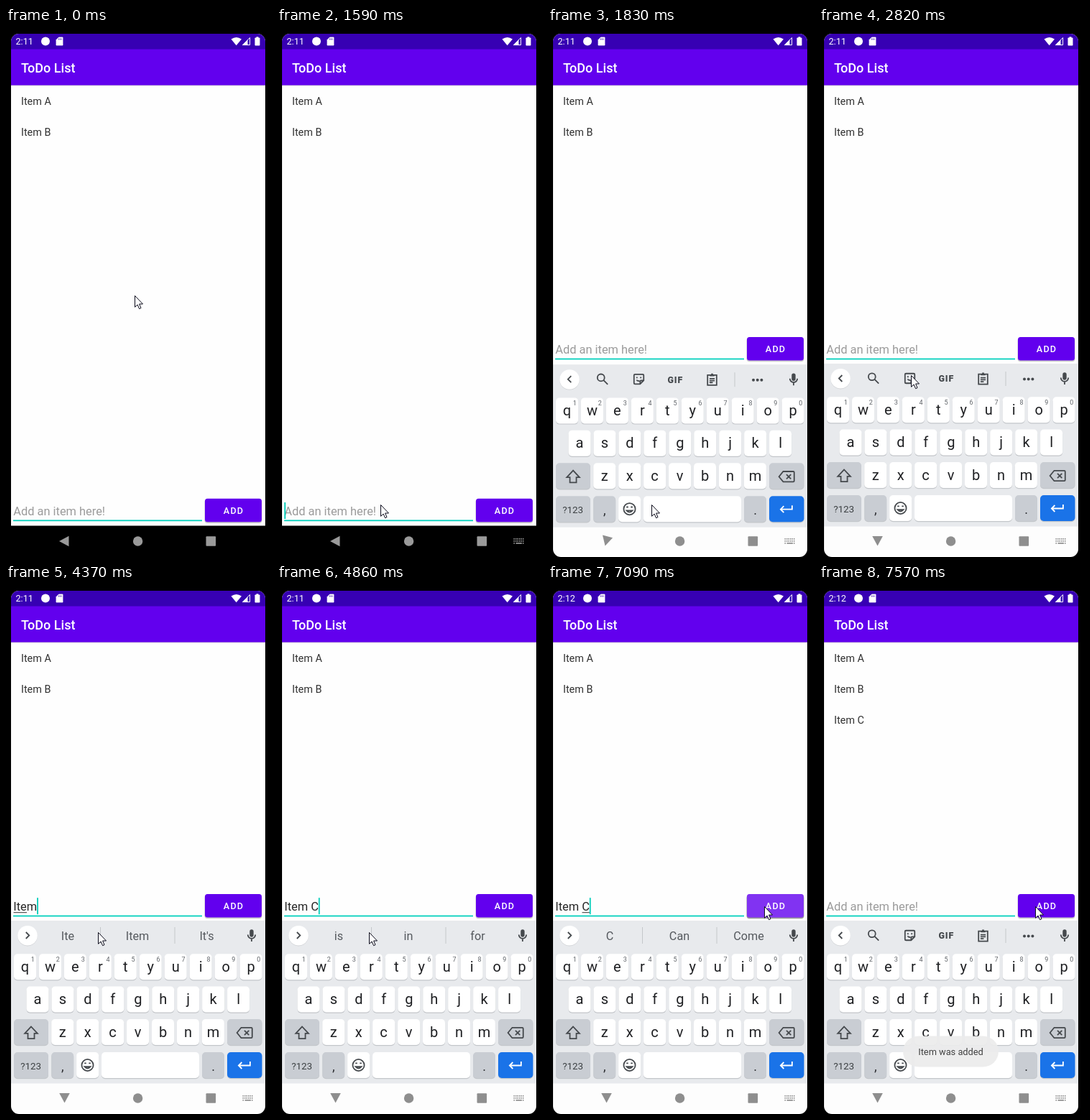
Animation of 369 by 736 pixels, one loop 8000 ms. Source, as an HTML page:

```html
<!DOCTYPE html>
<html lang="en">
<head>
<meta charset="utf-8">
<title>ToDo List</title>
<style>
html, body { margin: 0; width: 100%; height: 100%; overflow: hidden; background: #000; }
svg { display: block; width: 100vw; height: 100vh; }
text { font-family: Roboto, "Noto Sans", sans-serif; white-space: pre; }
.mid { text-anchor: middle; }
.icon { fill: none; stroke: #45494d; stroke-width: 2; }
</style>
</head>
<body>
<svg id="stage" viewBox="0 0 369 736"></svg>
<script>
const NS = 'http://www.w3.org/2000/svg';
const LOOP = 8000;
const stage = document.getElementById('stage');

function add(parent, tag, attrs = {}, text) {
  const el = document.createElementNS(NS, tag);
  for (const k in attrs) el.setAttribute(k, attrs[k]);
  if (text !== undefined) el.textContent = text;
  parent.appendChild(el);
  return el;
}
const group = (p, attrs) => add(p, 'g', attrs);
const rect = (p, x, y, width, height, fill, rx = 0) => add(p, 'rect', { x, y, width, height, fill, rx });
const dot = (p, cx, cy, r, fill) => add(p, 'circle', { cx, cy, r, fill });
const label = (p, x, y, size, fill, str, more) =>
  add(p, 'text', { x, y, 'font-size': size, fill, ...more }, str);
const icon = (p, x, y, d, more) =>
  add(p, 'path', { class: 'icon', d, transform: `translate(${x} ${y}) scale(.9)`, ...more });
const show = (el, on) => el.setAttribute('visibility', on ? 'inherit' : 'hidden');
const MID = { class: 'mid' };

// Screen
const clip = add(add(stage, 'defs'), 'clipPath', { id: 'screen' });
rect(clip, 7, 8, 354, 728, '#fff', 11);
rect(stage, 0, 0, 369, 736, '#000');
const screen = group(stage, { 'clip-path': 'url(#screen)' });
rect(screen, 7, 8, 354, 684.5, '#fefefe');
rect(screen, 7, 79, 354, 1, '#b9a3d8');
rect(screen, 7, 80, 354, 1, '#ececec');
rect(screen, 7, 29, 354, 50.5, '#6200ee');
rect(screen, 7, 8, 354, 21.5, '#3700b3');
label(screen, 21, 62, 18, '#fff', 'ToDo List', { 'font-weight': 500 });

// Status bar
const clock = label(screen, 13.5, 23.3, 12.6, '#fff', '2:11');
dot(screen, 55, 18.5, 6, '#fff');
add(screen, 'path', { d: 'M73.5 13H79V24H70V16.5Z', fill: '#fff', stroke: '#fff', 'stroke-linejoin': 'round', 'stroke-width': .8 });
add(screen, 'path', { d: 'M73.5 14.5v2M75.3 14.5v2M77.1 14.5v2', stroke: '#3700b3', 'stroke-width': .8 });
add(screen, 'path', { d: 'M313.5 15.5Q320.7 10.5 328 15.5L320.7 24.2Z', fill: '#fff' });
add(screen, 'path', { d: 'M329.5 23.6L339.6 13.5V23.6Z', fill: 'none', stroke: '#fff' });
add(screen, 'path', { d: 'M329 24L336.5 16.5V24Z', fill: '#fff' });
rect(screen, 346.5, 13.5, 7, 11, '#fff', .8);
rect(screen, 348.5, 12.3, 3, 2, '#fff');

// List
const items = ['A', 'B', 'C'].map((c, i) =>
  label(screen, 21, 107 + 43.2 * i, 14.4, '#303030', 'Item ' + c));

// Entry row
const row = group(screen);
const hint = label(row, 10.3, 678, 16.4, '#9b9b9b', 'Add an item here!');
const typed = label(row, 10.3, 678, 16.4, '#262626', '');
const mark = rect(row, 10, 680, 0, 1, '#333');
rect(row, 10, 684.4, 263, 1.8, '#03d0bd');
const caret = rect(row, 10, 660, 1.8, 23, '#03cdb9');
const shade = rect(row, 276.5, 656, 80, 33, '#000', 4);
rect(row, 277, 654.8, 79, 32.4, '#6200ee', 3.5);
const ripple = rect(row, 277, 654.8, 79, 32.4, '#fff', 3.5);
label(row, 317, 675.6, 12.6, '#fff', 'ADD', { class: 'mid', 'font-weight': 500, 'letter-spacing': 1.15 });

// Keyboard
const board = group(screen);
rect(board, 7, 467, 354, 227, '#e8eaed');
rect(board, 7, 693.5, 354, 70, '#fdfdfd');
dot(board, 30, 488.6, 13.8, '#cfd1d4');
dot(board, 30, 487.8, 13.8, '#fff');
const chevron = icon(board, 30, 487.5, 'M2.5 -5L-2.5 0L2.5 5');
icon(board, 342, 487.5, 'M-5.8 -1a5.8 5.8 0 0 0 11.6 0M0 5V9.5');
rect(board, 339.3, 479.2, 5.4, 10.5, '#45494d', 2.7);

const tools = group(board);
icon(tools, 76, 487.5, 'M-8 -2.5a5.5 5.5 0 1 0 11 0a5.5 5.5 0 1 0 -11 0M1.6 1.6L8 8');
icon(tools, 126.5, 487.5, 'M-6 -7.5H6Q7.5 -7.5 7.5 -6V2L2 7.5H-6Q-7.5 7.5 -7.5 6V-6Q-7.5 -7.5 -6 -7.5ZM7.5 2H3.5Q2 2 2 3.5V7.5M-4 -2.5h2M2 -2.5h2M-3.5 1Q-2 3.5 1 2.5');
label(tools, 177.4, 492.4, 12.4, '#45494d', 'GIF', { class: 'mid', 'font-weight': 900, 'letter-spacing': 1 });
icon(tools, 228.5, 488, 'M-7 -7H7V8.5H-7ZM-4 -1.5H4M-4 1.5H4M-4 4.5H1');
icon(tools, 228.5, 488, 'M-3.5 -6.2H3.5M-1.5 -8.4H1.5', { 'stroke-width': 2.6 });
rect(tools, 259.5, 478, 1, 20, '#c4c7ca');
for (const x of [286, 291.7, 297.4]) dot(tools, x, 488.5, 2, '#45494d');

const hints = group(board);
const words = [86, 183, 279.5].map(x => label(hints, x, 493.8, 16.2, '#55595e', '', MID));
for (const x of [131, 234.5]) rect(hints, x, 476, 1, 23, '#c4c7ca');

const PITCH = 34.95;
function key(x, y, w, fill) {
  rect(board, x, y + 1.2, w, 36, '#c3c6ca', 5);
  rect(board, x, y, w, 36, fill, 5);
}
function letters(str, x0, y, digits) {
  [...str].forEach((c, i) => {
    const x = x0 + PITCH * i;
    key(x, y, 31, '#fff');
    label(board, x + 15.5, y + 24.6, 20, '#1f2023', c, MID);
    if (digits) label(board, x + 26.3, y + 10.8, 9, '#5f6368', (i + 1) % 10, MID);
  });
}
letters('qwertyuiop', 11, 513.2, true);
letters('asdfghjkl', 28.5, 558.5);
letters('zxcvbnm', 63.2, 604);
const GREY = '#c9cdd3';
key(11, 604, 48, GREY);
key(308, 604, 48.5, GREY);
key(11, 650, 48, GREY);
key(63.2, 650, 31, GREY);
key(98.1, 650, 31, '#fff');
key(133, 650, 136, '#fff');
key(273, 650, 31, GREY);
key(308, 650, 48.5, '#1a73e8');
icon(board, 35, 623, 'M0 -9.5L-9.8 1H-5V9H5V1H9.8Z');
icon(board, 332, 623, 'M-5 -8H10.5Q12 -8 12 -6.5V6.5Q12 8 10.5 8H-5L-11.5 0ZM0 -3.5L7 3.5M7 -3.5L0 3.5');
icon(board, 113.5, 668, 'M-9 0a9 9 0 1 0 18 0a9 9 0 1 0 -18 0M-4.8 -3h2.8M2 -3h2.8M-4.5 2.5Q0 7.5 4.5 2.5Z');
icon(board, 332, 668.5, 'M8.8 -6V0H-8.5M-4 -5L-9 0L-4 5', { style: 'stroke:#fff' });
label(board, 34.7, 673.6, 13.4, '#3c4043', '?123', MID);
label(board, 78.7, 675.5, 18, '#2b2d30', ',', MID);
label(board, 288.6, 675.5, 18, '#2b2d30', '.', MID);

// Navigation bar
const nav = group(stage, { fill: '#9a9a9a' });
const back = add(nav, 'path', { d: 'M-7.5 0L6 -7.3V7.3Z' });
dot(nav, 183.6, 714, 6.7, 'inherit');
rect(nav, 278.5, 707.2, 13.6, 13.6, 'inherit', 1);
const mini = group(nav);
for (let r = 0; r < 3; r++)
  for (let c = 0; c < 6; c++)
    if (r < 2 || c === 0 || c === 5) rect(mini, 329.5 + c * 2.5, 710 + r * 3, 1.5, 1.7, 'inherit');
rect(mini, 332.5, 716, 8.5, 1.7, 'inherit');

// Toast
const toast = group(stage);
rect(toast, 117, 627.5, 133, 43, '#ececec', 21.5);
label(toast, 183.5, 653.7, 12.8, '#333', 'Item was added', MID);

const pointer = add(stage, 'path', {
  d: 'M.5 .5V16.3L4.1 13L6.6 18.7L9 17.6L6.6 12H11.5Z', fill: '#fff', stroke: '#0a0a1a'
});

// Step tables: each row starts with the time it takes effect
const MOVES = [
  [0, 179, 372], [380, 182, 385], [500, 186, 425], [620, 184, 485], [740, 176, 550],
  [860, 163, 606], [980, 151, 645], [1100, 144, 662], [1220, 144, 663],
  [2220, 143, 640], [2340, 140, 590], [2460, 135, 535], [2580, 131, 500], [2700, 128, 483],
  [5920, 176, 449], [6040, 220, 436], [6190, 272, 446], [6330, 296, 447], [6470, 301, 447]
];
const BLINK = [0, 380, 860, 1340, 1830, 2340, 2820, 3320, 3720, 3840, 5510, 6040, 6590, 7090, 7570];
// text, underline from, underline to, suggestions
const ENTRY = [
  [0, '', 0, 0, ''],
  [3840, 'I', 0, 0, ''],
  [4090, 'I', 0, 1, "I|I'm|I'll"],
  [4230, 'Ite', 0, 2, "I|I'm|I'll"],
  [4370, 'Item', 0, 3, "Ite|Item|It's"],
  [4490, 'Item', 0, 4, 'Items|Item|Itemized'],
  [4740, 'Item ', 0, 0, 'is|in|for'],
  [4860, 'Item C', 0, 0, 'is|in|for'],
  [5110, 'Item C', 5, 6, 'C|Can|Come'],
  [7210, '', 0, 0, '']
];
const SLIDE = [[0, 300, 0], [1710, 60, -35], [1830, 1.2, -75], [1970, 0, -90]];
const TOAST = [[0, 0], [7330, .3], [7450, .65], [7570, .92]];
const PRESS = [[0, 0], [7090, .2], [7210, .15], [7330, .08], [7450, .03], [7570, 0]];

const at = (table, t) => table.filter(r => r[0] <= t).pop().slice(1);

let last;
function setEntry(text, from, to, list) {
  const id = text + from + to + list;
  if (id === last) return;
  last = id;
  typed.textContent = text;
  const width = n => n ? typed.getSubStringLength(0, n) : 0;
  show(hint, !text);
  mark.setAttribute('x', 10.5 + width(from));
  mark.setAttribute('width', width(to) - width(from));
  caret.setAttribute('x', 10.2 + width(text.length));
  show(tools, !list);
  show(hints, list);
  list.split('|').forEach((w, i) => words[i].textContent = w);
  chevron.setAttribute('d', list ? 'M-2.5 -5L2.5 0L-2.5 5' : 'M2.5 -5L-2.5 0L2.5 5');
}

function draw(t) {
  const [x, y] = at(MOVES, t);
  pointer.setAttribute('transform', `translate(${x} ${y})`);
  setEntry(...at(ENTRY, t));
  show(caret, BLINK.filter(b => b <= t).length % 2 === 0);

  const [drop, turn] = at(SLIDE, t);
  const open = t >= 1710;
  show(board, open);
  board.setAttribute('transform', `translate(0 ${drop})`);
  row.setAttribute('transform', `translate(0 ${open ? -224.8 : 0})`);
  back.setAttribute('transform', `translate(81.5 ${714 - turn / 90 * -1}) rotate(${turn})`);
  nav.setAttribute('fill', open ? '#8e8e8e' : '#9a9a9a');
  show(mini, t >= 1590);

  const [press] = at(PRESS, t);
  ripple.setAttribute('opacity', press);
  shade.setAttribute('opacity', .2 + press);
  toast.setAttribute('opacity', at(TOAST, t)[0]);
  show(items[2], t >= 7210);
  const time = t >= 6330 ? '2:12' : '2:11';
  if (clock.textContent !== time) clock.textContent = time;
}

const start = performance.now();
function tick(now) {
  draw(Math.max(0, now - start) % LOOP);
  requestAnimationFrame(tick);
}
draw(0);
requestAnimationFrame(tick);
</script>
</body>
</html>
```
